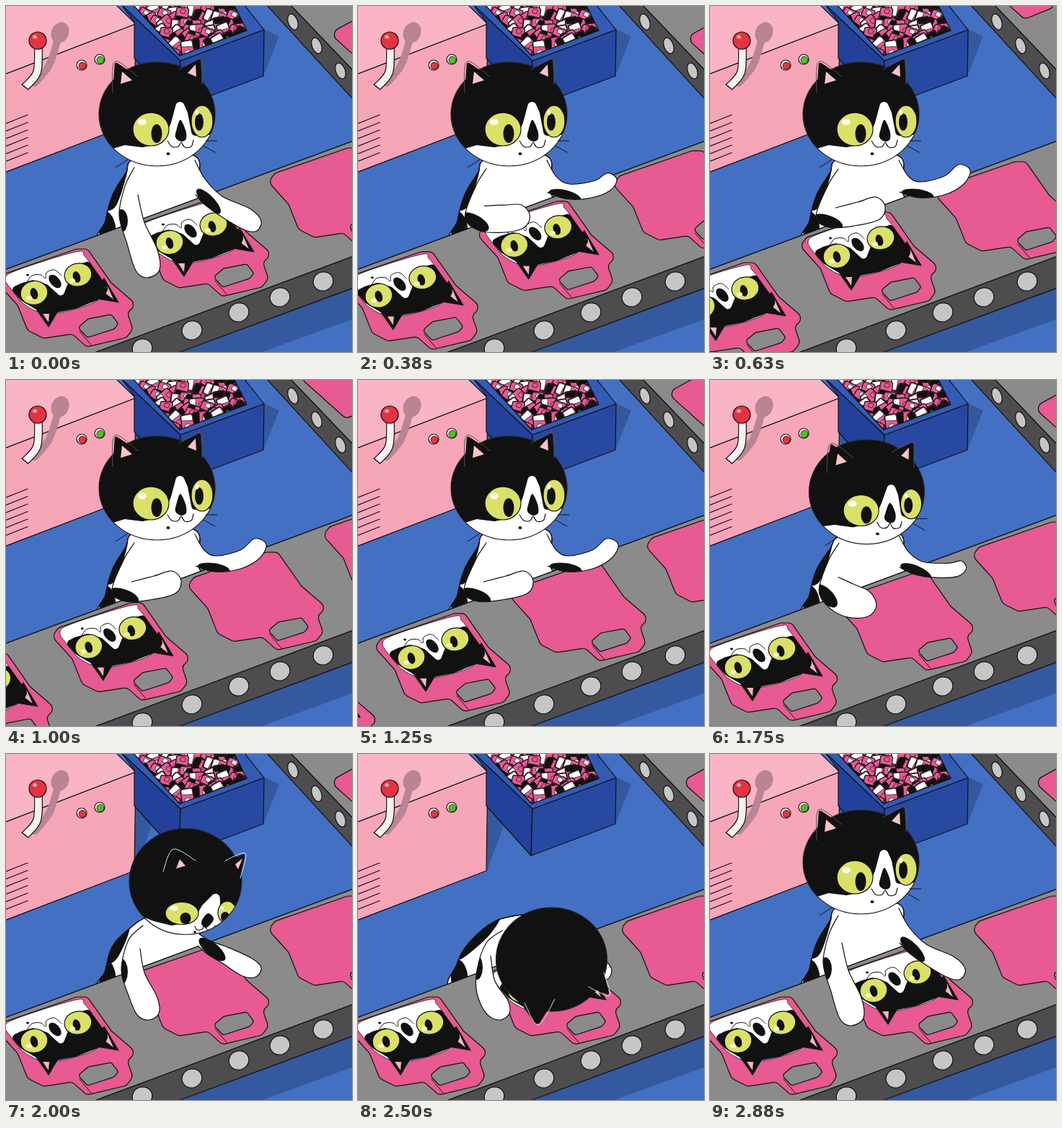
Recreate the animation shown at these times as an HTML page with a canvas. Size 480x480 px, loop 3010 ms.

```html
<!DOCTYPE html>
<html lang="en">
<head>
<meta charset="utf-8">
<title>Cat factory</title>
<style>
html, body { margin: 0; width: 100%; height: 100%; overflow: hidden; background: #4470c4; }
canvas { display: block; width: 480px; height: 480px; }
</style>
</head>
<body>
<canvas id="stage" width="480" height="480"></canvas>
<script>
const c = document.getElementById('stage').getContext('2d');
const LOOP = 3010, INK = '#111', PINK = '#e75a92', BELT = '#8b8b8b', EYE = '#dbe068', SHADE = '#34599f';

// Per step: lean 0 = upright, 1 = bowed, 2 = face down; reach 1 = arms lifted off the belt
const LEAN = [0,0,0,0,0,0,0,0,0,0,0,0,0,0,.2,.6,1,1.15,1.5,1.85,2,1.85,.8,0];
const REACH = [0,.1,.5,.85,1,1,1,1,1,1,1,1,1,.9,.6,.2,0,0,0,0,0,0,0,0];

const mix = (a, b, k) => a.map((v, i) => v + (b[i] - v) * k);
const pose = (lean, up, bowed, down) => lean < 1 ? mix(up, bowed, lean) : mix(bowed, down, lean - 1);
const move = (list, dx, dy) => list.map((v, i) => v + (i % 2 ? dy : dx));
const pairs = list => list.flatMap((v, i) => i % 2 ? [] : [[v, list[i + 1]]]);

function poly(list, r = 0) {
  const p = pairs(list), n = p.length, path = new Path2D();
  p.forEach(([x, y], i) => {
    const [nx, ny] = p[(i + 1) % n];
    const mx = (x + nx) / 2, my = (y + ny) / 2;
    if (!r) return path.lineTo(x, y);
    if (!i) path.moveTo((x + p[n - 1][0]) / 2, (y + p[n - 1][1]) / 2);
    path.arcTo(x, y, mx, my, r);
  });
  path.closePath();
  return path;
}

// Smooth curve through the points
function curve(list, closed = false) {
  const p = pairs(list), n = p.length, path = new Path2D();
  const at = i => closed ? p[(i + n) % n] : p[Math.max(0, Math.min(n - 1, i))];
  path.moveTo(...p[0]);
  for (let i = 0; i < (closed ? n : n - 1); i++) {
    const a = at(i - 1), b = at(i), d = at(i + 1), e = at(i + 2);
    path.bezierCurveTo(b[0] + (d[0] - a[0]) / 6, b[1] + (d[1] - a[1]) / 6,
      d[0] - (e[0] - b[0]) / 6, d[1] - (e[1] - b[1]) / 6, d[0], d[1]);
  }
  return path;
}

function oval(x, y, rx, ry = rx, turn = 0) {
  const path = new Path2D();
  path.ellipse(x, y, rx, ry, turn, 0, 7);
  return path;
}

function draw(path, fill, line = INK, width = 1.2) {
  if (fill) { c.fillStyle = fill; c.fill(path); }
  if (line) { c.strokeStyle = line; c.lineWidth = width; c.stroke(path); }
}

const line = (list, color = INK, width = 1.2) => draw(curve(list), null, color, width);

function within(path, paint) {
  c.save();
  c.clip(path);
  paint();
  c.restore();
}

function machine() {
  draw(poly([178,26, 202,50, 202,100, 179,162]), SHADE, null);
  draw(poly([-2,-2, 152,-2, 180,25, -2,95]), '#fab5c4');
  draw(poly([-2,95, 180,25, 178,162, -2,231]), '#f7a6b8');
  for (let y = 163; y < 225; y += 10.5) line([0, y, 30, y - 12]);
  draw(oval(75, 37, 12, 15, .4), '#b98493', null);
  line([72,45, 60,82, 40,107], '#b98493', 10);
  c.lineCap = 'butt';
  line([45,56, 43,92, 26,113], INK, 12);
  line([45,56, 43,92, 27,112], '#f4f2f2', 9.6);
  c.lineCap = 'round';
  draw(oval(44, 48, 12), '#e5343f');
  draw(oval(40, 43, 3, 2.5), '#fba7a7', null);
  [[106, 82, '#e5343f'], [131, 74, '#4fc32d']].forEach(([x, y, color]) => {
    draw(oval(x - 1, y, 7), '#f6eded');
    draw(oval(x, y + 1, 5), color, INK, .8);
  });
}

function bin() {
  draw(poly([358,32, 379,42, 357,97]), SHADE, null);
  draw(poly([160,-2, 242,76, 240,141, 178,72, 178,22]), '#23419a');
  draw(poly([242,76, 358,33, 357,97, 240,141]), '#2849a2');
  draw(poly([160,-2, 242,76, 358,33, 330,-2]), '#315bb5');
  const opening = poly([176,-2, 241,69, 334,34, 316,-2]);
  draw(opening, '#23419a');
  let seed = 11;
  const random = () => (seed = seed * 16807 % 2147483647) / 2147483647;
  within(opening, () => {
    for (let i = 0; i < 75; i++) {
      const row = Math.floor(i / 10);
      c.save();
      c.translate(180 + (i % 10) * 16 + random() * 12, row * 9 - 5 + random() * 8);
      c.rotate(random() * 3 - 1.5);
      draw(poly([-11,-8, 10,-9, 12,8, -10,9], 3), PINK);
      draw(poly([-10,-7, -1,-8, -2,8, -9,8], 2), random() < .55 ? '#fff' : INK, INK, .7);
      draw(poly([3,-3, 9,-3, 9,4, 3,4], 2), random() < .6 ? PINK : '#fff', INK, .7);
      c.restore();
    }
  });
  draw(opening);
}

function backBelt(shift) {
  draw(poly([394,-2, 482,-2, 482,90]), BELT);
  const k = (shift - 1) * 108;
  [0, 108].forEach(d => within(poly([394,-2, 482,-2, 482,90]), () =>
    draw(poly(move([500,10, 449,38, 515,97, 562,78], k + d, k + d), 9), PINK)));
  draw(poly([361,-2, 394,-2, 482,90, 482,130]), '#4d4d50');
  [[398, 22], [431, 55], [464, 90]].forEach(([x, y]) => draw(oval(x, y, 6.5, 11.5, -.35), '#c6c6c6'));
}

function frontBelt() {
  draw(poly([-2,366, 482,187, 482,348, 120,482, -2,482]), BELT);
  draw(poly([482,391, 482,434, 350,482, 238,482]), SHADE, null);
  draw(poly([482,347, 482,391, 236,482, 120,482]), '#4d4d50');
  [[189, 475], [258, 450], [323, 425], [380, 404], [440, 382]].forEach(([x, y]) =>
    draw(oval(x, y, 14, 13, -.4), '#c6c6c6'));
}

function print() {
  draw(curve([187,308, 205,296, 285,271, 297,277, 312,297, 326,320, 315,338, 285,350, 245,357, 215,345, 197,325], true), '#fff', INK, .8);
  draw(poly([226,345, 247,375, 263,348]), INK);
  draw(poly([308,335, 344,341, 324,308]), INK);
  draw(poly([239,357, 247,369, 248,357]), '#f5b5bd', null);
  draw(poly([324,327, 337,337, 329,319]), '#f5b5bd', null);
  draw(poly([194,322, 208,315, 225,310, 245,316, 266,335, 275,312, 283,290, 303,284, 318,305, 330,322, 325,332, 315,338, 285,350, 250,357, 228,350, 208,338], 5), INK, null);
  draw(oval(227, 328, 19, 16.5, -.2), EYE);
  draw(oval(288, 303, 19, 16, -.2), EYE);
  draw(oval(227, 329, 5, 8, -.3), INK, null);
  draw(oval(286, 306, 5, 8, -.3), INK, null);
  draw(oval(220, 335, 4, 3), '#f5f6c8', null);
  draw(oval(280, 311, 4, 3), '#f5f6c8', null);
  draw(oval(256, 312, 11, 6.5, .85), INK, null);
  line([217,313, 224,304, 236,303, 243,308, 244,300, 255,296, 265,304], INK, 1);
  draw(oval(218, 303, 2, 1.5), INK, null);
}

function bag(x, y, printed) {
  c.save();
  c.translate(x, y);
  draw(poly([176,314, 185,302, 286,267, 301,267, 334,314, 370,345, 356,355, 364,378, 355,390, 300,403, 280,385, 240,391, 218,380, 204,345], 9), PINK);
  draw(poly([288,376, 302,364, 334,358, 344,371, 338,378, 301,390], 4), BELT);
  line([290,381, 306,400], INK, 1);
  if (printed) print();
  c.restore();
}

function body(lean) {
  const torso = curve(pose(lean,
    [180,212, 166,232, 148,262, 138,298, 136,325, 275,305, 266,255, 262,208],
    [200,226, 168,245, 147,268, 138,300, 136,325, 280,305, 270,260, 262,230],
    [235,222, 190,232, 154,262, 137,292, 135,325, 280,305, 300,245, 262,224]), true);
  draw(torso, '#fff');
  within(torso, () => {
    draw(curve(pose(lean,
      [168,224, 145,255, 140,282, 152,278, 163,250],
      [170,240, 143,266, 138,290, 152,286, 166,260],
      [195,228, 150,258, 140,285, 160,272, 185,248]), true), INK, null);
    draw(curve([130,285, 146,290, 152,312, 138,325, 130,320], true), INK, null);
  });
  draw(torso);
}

function arm(lean, reach, shapes, patches) {
  const blend = ([up, bowed, down, lifted]) => mix(pose(lean, up, bowed, down), lifted, reach);
  const shape = curve(blend(shapes));
  draw(shape, '#fff', null);
  within(shape, () => draw(oval(...blend(patches)), INK, null));
  draw(shape);
}

function arms(lean, reach) {
  arm(lean, reach, [
    [262,214, 276,240, 300,264, 338,281, 354,298, 348,312, 332,311, 300,293, 275,275, 263,262],
    [268,250, 285,260, 305,267, 340,283, 354,296, 347,309, 328,308, 300,290, 280,278, 266,266],
    [300,262, 320,270, 335,282, 345,288, 352,300, 347,312, 335,312, 310,295, 300,285, 295,275],
    [262,214, 275,236, 292,244, 325,236, 345,220, 361,228, 352,247, 325,262, 290,266, 263,258]
  ], [[281,271,23,8,.8], [286,271,23,9,.7], [310,285,5,5,.7], [288,262,23,8,.15]]);
  arm(lean, reach, [
    [178,224, 165,250, 157,290, 168,330, 180,367, 196,377, 213,366, 210,338, 192,300, 183,262],
    [190,238, 170,258, 160,300, 170,335, 182,362, 198,369, 212,360, 210,338, 192,303, 186,270],
    [200,245, 178,262, 165,300, 165,332, 178,360, 196,369, 210,360, 208,342, 190,315, 184,280],
    [178,226, 163,250, 147,292, 165,307, 200,305, 235,296, 243,278, 230,265, 205,272, 174,280]
  ], [[160,298,16,9,1.57], [160,302,18,9,1.57], [165,296,17,8,1.57], [162,300,23,10,.3]]);
}

function face(lean) {
  const at = (up, bowed) => pose(lean, up, bowed, move(bowed, 29, 180));
  const spot = (up, bowed, fill, edge) => {
    const v = pose(lean, up, bowed, [bowed[0] + 29, bowed[1] + 180, bowed[2], bowed[3]]);
    draw(oval(...v), fill, edge);
  };
  draw(poly(at(
    [138,201, 165,193, 190,196, 217,190, 229,162, 240,121, 252,148, 258,180, 278,180, 298,172, 285,235, 140,235],
    [172,219, 205,232, 230,238, 260,232, 272,210, 296,186, 297,205, 296,226, 315,232, 335,225, 310,262, 172,262]), 6), '#fff', null);
  spot([201,171,25,23], [244,221,23,15.5], EYE, INK);
  spot([272,160,15,22], [307,220,13,15.5], EYE, INK);
  spot([209,177,7.5,13], [249,228,7.5,8], INK, null);
  spot([268,161,6,12], [304,226,6,7], INK, null);
  spot([189,161,6,4.5], [233,214,6,3.5], '#fafae0', null);
  spot([265,148,2.5,3.5], [300,214,2.5,2.5], '#fafae0', null);
  draw(curve(at([242,158, 249,172, 250,184, 243,188, 235,182, 237,170],
    [281,221, 288,228, 284,236, 277,241, 271,235, 274,227]), true), INK, null);
  line(at([224,187, 230,195, 239,195, 243,189, 248,196, 257,195, 260,186],
    [262,239, 265,244, 272,243, 275,239, 280,244, 288,243, 290,238]));
  spot([225,205,2.5,2], [262,247,2,1.5], INK, null);
}

function ear(lean, outer, inner) {
  draw(poly(pose(lean, ...outer), 2), INK, null);
  line(pose(lean, ...outer), lean > .5 ? '#ddd' : '#555', 1);
  draw(poly(pose(lean, ...inner)), '#f7c3c6', null);
}

function head(lean) {
  const skull = oval(...pose(lean, [209.5,150,80.5,72], [249,177,78,73.5], [268.5,285,77,72]));
  draw(skull, INK, null);
  within(skull, () => face(lean));
  draw(skull, null, '#222');
  ear(lean, [[148,120, 151,77, 183,98], [218,163, 232,132, 263,148], [231,345, 250,376, 273,340]],
    [[159,108, 161,91, 175,103], [236,159, 241,146, 249,155], [250,365, 250,365, 250,365]]);
  ear(lean, [[240,88, 270,73, 272,108], [304,148, 332,138, 325,172], [320,323, 349,335, 341,303]],
    [[252,93, 263,81, 264,98], [318,153, 328,145, 322,160], [340,325, 340,325, 340,325]]);
  if (lean < .5) {
    const dx = lean * 40, dy = lean * 27;
    [[274,194, 290,203], [277,187, 293,187], [152,224, 169,213]].forEach(w => line(move(w, dx, dy), INK, 1));
  }
}

function render(step) {
  const shift = Math.max(0, Math.min(1, (step - 2.5) * 20.4 / 188));
  const lean = LEAN[step];
  c.lineJoin = c.lineCap = 'round';
  c.fillStyle = '#4470c4';
  c.fillRect(0, 0, 480, 480);
  machine();
  bin();
  backBelt(shift);
  body(lean);
  frontBelt();
  for (let i = -1; i < 3; i++)
    bag((i - shift) * 188, (shift - i) * 70, i < 1 || (i === 1 && step >= 20));
  arms(lean, REACH[step]);
  head(lean);
}

let shown = -1;
function tick() {
  const t = performance.now() % LOOP;
  const step = Math.min(23, Math.floor(t / 250) * 2 + (t % 250 >= 130 ? 1 : 0));
  if (step !== shown) render(shown = step);
  requestAnimationFrame(tick);
}
tick();
</script>
</body>
</html>
```
